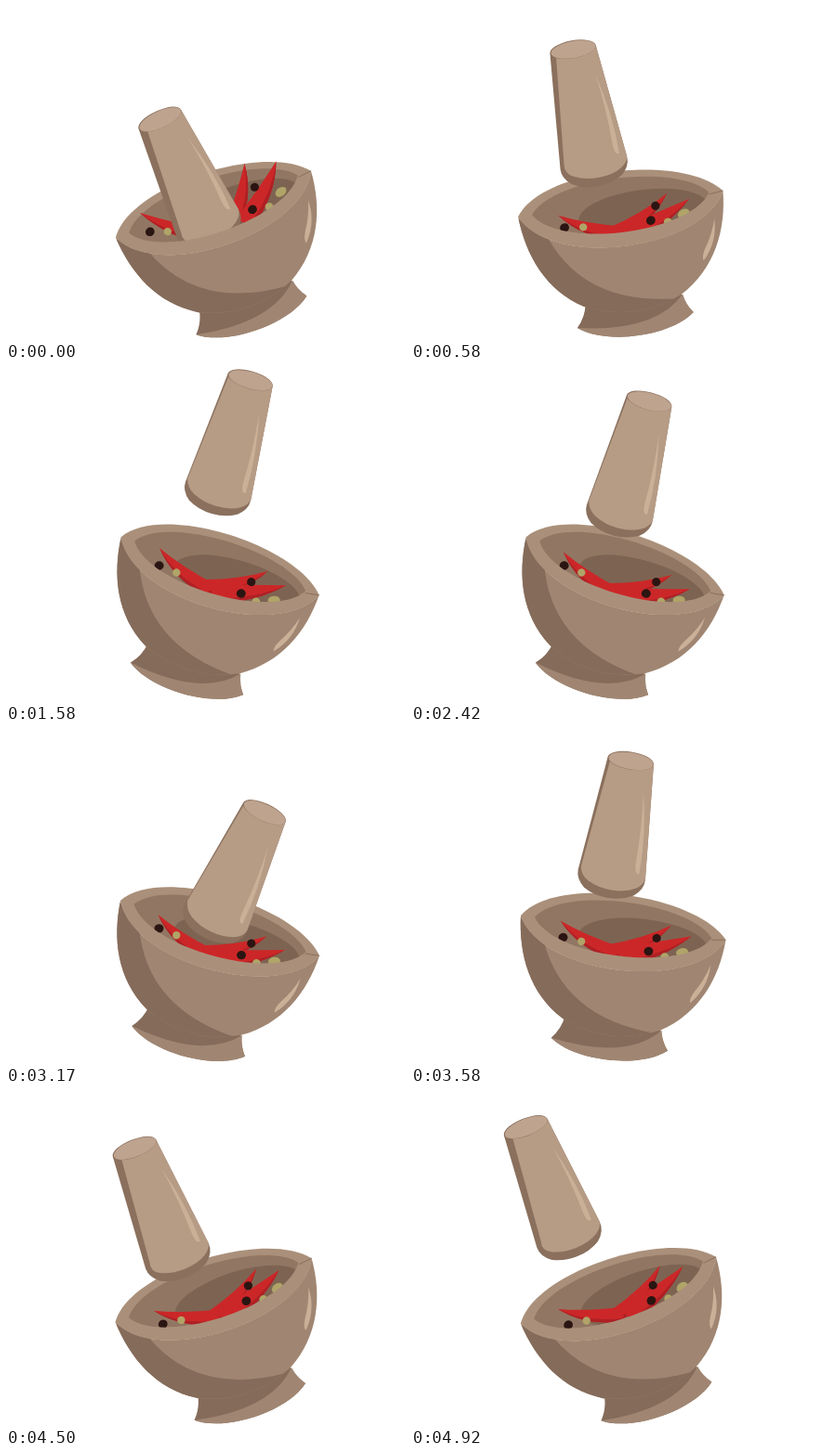
An HTML page with a canvas for the animation above (5 s loop, 429 by 360 pixels).

```html
<!DOCTYPE html>
<html lang="en">
<head>
<meta charset="utf-8">
<title>Mortar and pestle</title>
<style>
  html, body { margin: 0; width: 100%; height: 100%; overflow: hidden; background: #fff; }
  canvas { display: block; }
</style>
</head>
<body>
<canvas id="stage" width="429" height="360"></canvas>
<script>
const ctx = document.getElementById('stage').getContext('2d');
const LOOP = 5000, STEPS = 60, STRIKES = 11;
const PIVOT = [226.8, 225];
const C = {
  body: '#a08672', shade: '#856b5a', rim: '#aa907a', wall: '#917763', deep: '#7d6452',
  pestle: '#b69b85', cap: '#bea38f', side: '#8a705d', glint: '#cbb098',
  chili: '#cc2728', chiliDark: '#ae2024', black: '#2b1512', olive: '#b0a468'
};

const clamp = (v, a = 0, b = 1) => Math.min(b, Math.max(a, v));
const mix = (a, b, k) => a + (b - a) * k;
const mixPt = (a, b, k) => [mix(a[0], b[0], k), mix(a[1], b[1], k)];
const ease = k => (1 - Math.cos(Math.PI * clamp(k))) / 2;
const rad = deg => deg * Math.PI / 180;

function fill(color, d) {
  ctx.fillStyle = color;
  ctx.fill(typeof d === 'string' ? new Path2D(d) : d);
}

function oval(color, x, y, rx, ry = rx, turn = 0) {
  const p = new Path2D();
  p.ellipse(x, y, rx, ry, turn, 0, Math.PI * 2);
  fill(color, p);
}

function clipped(path, paint) {
  ctx.save();
  ctx.clip(path);
  paint();
  ctx.restore();
}

// Edges of the rim, pointed where front and back meet
const OUTER_BACK = 'M-111 -12C-80 -60 72 -58 111 -12';
const OUTER_FRONT = 'C82 49 -82 49 -111 -12';
const INNER_FRONT = 'C71 29 -71 29 -96 -12';
const OPENING = new Path2D('M-96 -12C-69 -50 67 -48 96 -12' + INNER_FRONT + 'Z');
const SHELL = new Path2D('M-111 -12C-108 30 -92 70 -53 93Q0 117 53 93C92 70 109 30 111 -12' + OUTER_FRONT + 'Z');

function pose(t) {
  const tilt = -18.9 + 35.3 * (ease(t / 1500) - ease((t - 3000) / 1667));
  const p = t / LOOP * STRIKES % 1;
  // 1 at impact, 0 at the top of the stroke
  const s = p < .65 ? 1 - Math.sin(Math.PI / 2 * p / .65) : ((p - .65) / .35) ** 3;
  const hop = p >= .975 ? 1 : clamp(1 - p / .25) ** 2;
  const lift = 8 * Math.max(0, Math.sin(Math.PI * (p - .38) / .59));
  const lean = Math.cos(Math.PI / 2 * clamp((t - 3167) / 700, -1, 1)) ** 2;
  return {
    tilt, hop, lift,
    x: -26 + 16 * s + .36 * (1 - s) * Math.min(0, tilt) + 3 * lean,
    y: -73 + 104 * s - 2 * lean,
    turn: -1 - 4.7 * s + .07 * (1 - s) * tilt + 13.4 * lean
  };
}

function chili(tip, base, w, sag) {
  const dx = base[0] - tip[0], dy = base[1] - tip[1], len = Math.hypot(dx, dy);
  const nx = -dy / len * w, ny = dx / len * w;
  const mx = (tip[0] + base[0]) / 2 + sag[0], my = (tip[1] + base[1]) / 2 + sag[1];
  const edge = k => `Q${mx + nx * k} ${my + ny * k} ${base[0] + nx * k} ${base[1] + ny * k}`;
  const back = k => `Q${mx + nx * k} ${my + ny * k} ${tip[0]} ${tip[1]}`;
  const end = k => `L${base[0] + nx * k} ${base[1] + ny * k}`;
  const start = `M${tip[0]} ${tip[1]}`;
  fill(C.chili, start + edge(1) + end(-1) + back(-1) + 'Z');
  const dark = dx > 0 ? 1 : -1;
  fill(C.chiliDark, start + edge(dark) + end(dark * .55) + back(dark * .55) + 'Z');
}

// Each: resting and tossed tip, resting and tossed base, width, resting and tossed bend
const CHILIES = [
  [[51, -17], [46, -43], [-12, 19], [16, 12], 8, [7, 7], [6, 2]],
  [[-68, -8], [-78, -29], [-3, 20], [-22, 16], 8, [-7, 6], [-4, 5]],
  [[74, -8], [79, -34], [0, 23], [25, 18], 10, [5, 4], [7, 3]]
];
const CORNS = [
  ['black', [-63, 6], [-74, -6], 5], ['black', [37, -5], [48, -15], 4.6],
  ['black', [30, 10], [38, 7], 5], ['olive', [-43, 8], [-56, 0], 4.2],
  ['olive', [48, 14], [56, 10], 4.4], ['olive', [66, 7], [73, -1], 6.6]
];

function contents({ hop, lift }) {
  ctx.save();
  ctx.translate(0, -lift);
  for (const [tip, tip2, base, base2, w, bend, bend2] of CHILIES)
    chili(mixPt(tip, tip2, hop), mixPt(base, base2, hop), w, mixPt(bend, bend2, hop));
  ctx.restore();
  for (const [color, rest, tossed, r] of CORNS) {
    const [x, y] = mixPt(rest, tossed, hop);
    oval(C[color], x, y, r, Math.min(r, 4.7), -.35);
  }
}

function pestle({ x, y, turn, tilt }) {
  ctx.save();
  ctx.translate(x, y);
  ctx.rotate(rad(turn));
  const strip = clamp(4.5 - .2 * tilt, 1.5, 8);
  fill(C.side, 'M-25 -149L-36.5 -24Q-37 -14 -27 -6Q-15 1 0 1Q15 1 27 -6Q37 -14 36.5 -24L25 -149Z');
  fill(C.pestle, `M${strip - 25} -146L${strip * .8 - 36.5} -28Q-33 -19 -24 -14Q-12 -8 2 -8` +
    'Q18 -8 28 -14Q36 -19 36.5 -26L25 -149Z');
  oval(C.side, 0, -149, 25, 9.5);
  oval(C.cap, .4, -148.7, 24.3, 9);
  fill(C.glint, 'M19 -118Q30 -72 29 -30Q24 -28 23.5 -40Q24 -80 19 -118Z');
  ctx.restore();
}

function bowlBack() {
  fill(C.rim, OUTER_BACK + OUTER_FRONT + 'Z');
  fill(C.wall, OPENING);
  clipped(OPENING, () => oval(C.deep, 23, 1, 70, 25));
}

function bowlFront() {
  fill(C.shade, 'M-51 90Q-53 104 -63 115C-35 137 35 137 63 114Q55 104 52 90Z');
  fill(C.body, 'M-63 115Q20 130 54 93Q56 105 63 114C35 137 -35 137 -63 115Z');
  fill(C.body, SHELL);
  clipped(SHELL, () => fill(C.shade, 'M-84 10Q-54 92 48 97L40 125L-120 125L-125 -20Z'));
  fill(C.glint, 'M98 17Q98 42 81 60Q79 56 85 46Q93 34 98 17Z');
  fill(C.rim, 'M111 -12' + OUTER_FRONT + 'L-96 -12C-71 29 71 29 96 -12Z');
  ctx.strokeStyle = C.shade;
  ctx.lineWidth = .8;
  ctx.stroke(new Path2D('M111 -12L96 -10'));
}

function draw(t) {
  const now = pose(t);
  ctx.fillStyle = '#fff';
  ctx.fillRect(0, 0, 429, 360);
  ctx.save();
  ctx.translate(...PIVOT);
  ctx.rotate(rad(now.tilt));
  bowlBack();
  contents(now);
  pestle(now);
  bowlFront();
  ctx.restore();
}

function tick() {
  const step = Math.floor((performance.now() % LOOP + 4) * STEPS / LOOP) % STEPS;
  draw(step * LOOP / STEPS);
  requestAnimationFrame(tick);
}
tick();
</script>
</body>
</html>
```
